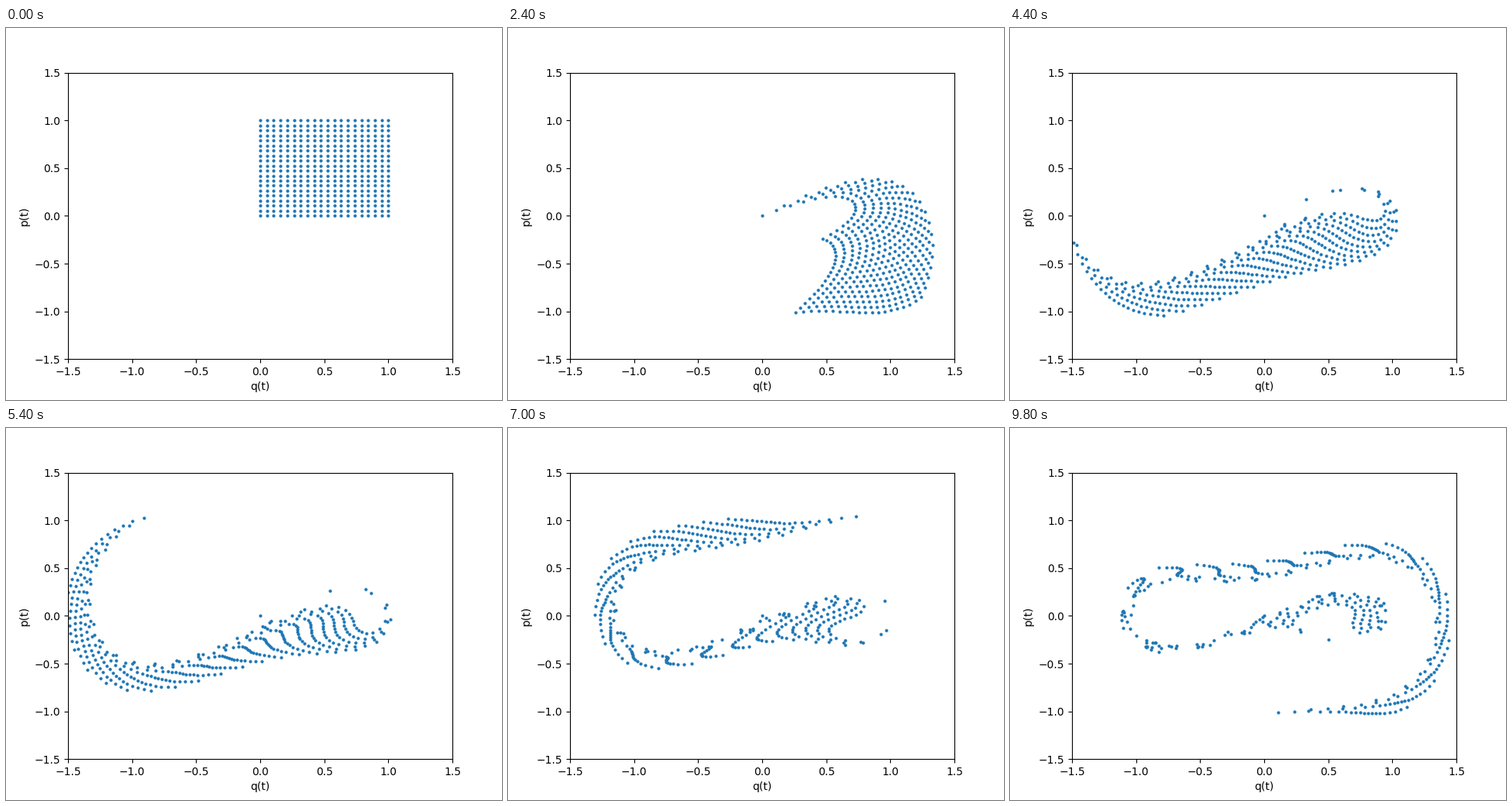
A matplotlib script that plays this animation: 640x480 px, repeating every 10000 ms.

```python
import numpy as np
import matplotlib.pyplot as plt
from matplotlib.animation import FuncAnimation

# Phase flow of H(q, p) = p^2 + (q^2 - B)^2 / A
A, B = 3, 0.5
STEP = 5e-4
FRAMES = 50
STEPS_PER_FRAME = 200
SIDE = 20


def force(q):
    return -8 / A * q * (q**2 - B)


def flow(q0, p0):
    """Two-step scheme; returns the (q, p) cloud for every frame."""
    prev, cur = q0, q0 + 2 * p0 * STEP
    clouds = [(q0, p0)]
    for i in range(1, (FRAMES - 1) * STEPS_PER_FRAME + 1):
        if i > 1:
            prev, cur = cur, 2 * cur - prev + STEP**2 * force(prev)
        if i % STEPS_PER_FRAME == 0:
            clouds.append((cur, (cur - prev) / (2 * STEP)))
    return clouds


axis = np.linspace(0, 1, SIDE)
q_grid, p_grid = np.meshgrid(axis, axis)
clouds = flow(q_grid.ravel(), p_grid.ravel())

plt.rcParams["font.family"] = "DejaVu Sans"
fig, ax = plt.subplots(figsize=(6.4, 4.8), dpi=100)
ax.set_xlim(-1.5, 1.5)
ax.set_ylim(-1.5, 1.5)
ax.set_xlabel("q(t)")
ax.set_ylabel("p(t)")
dots, = ax.plot([], [], "o", markersize=2, color="tab:blue")


def draw(k):
    dots.set_data(*clouds[k])
    return dots,


anim = FuncAnimation(fig, draw, frames=FRAMES, interval=200,
                     repeat=True, repeat_delay=0)
plt.show()
```
